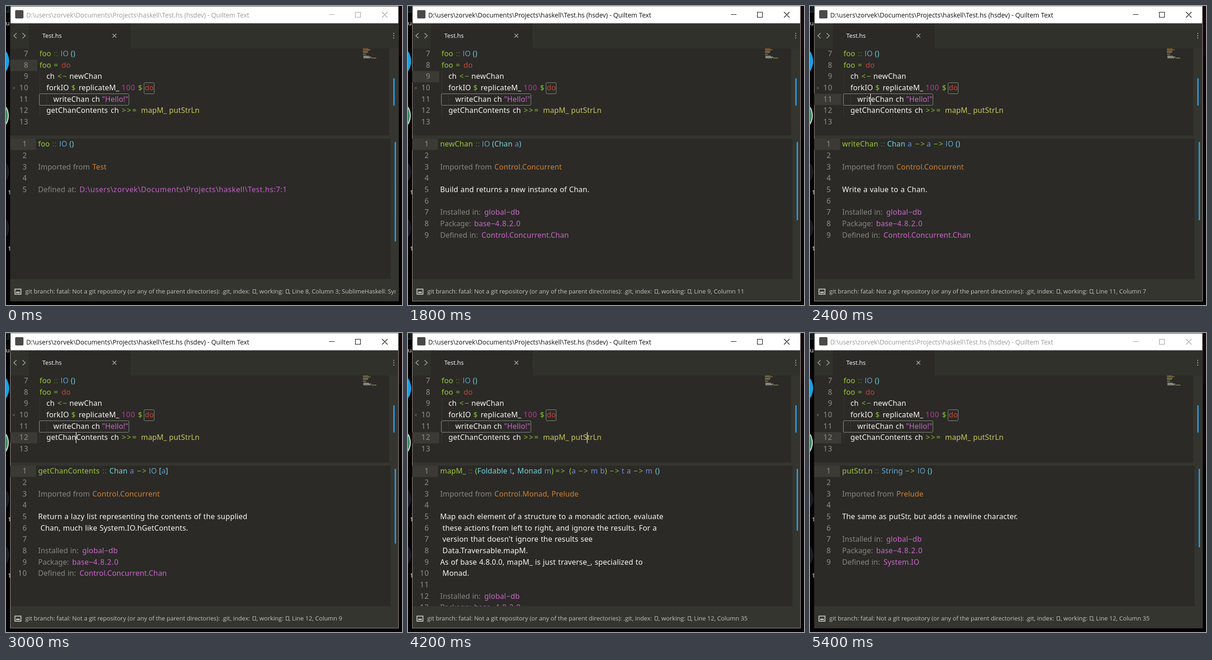
Write an HTML page that moves like this. It is 862x649 px and loops after 5.6 s.

```html
<!DOCTYPE html>
<html lang="en">
<head>
<meta charset="utf-8">
<title>Symbol info panel</title>
<style>
  html, body { margin: 0; width: 100%; height: 100%; overflow: hidden; background: #000; }
  svg { display: block; }
  text { white-space: pre; }
  .code { font: 16px "Noto Sans", sans-serif; letter-spacing: .17px; word-spacing: .7px; fill: #f8f8f2; }
  .ui { font: 13.1px "Open Sans", sans-serif; fill: #c4c4be; }
  .num { fill: #8f908a; letter-spacing: .9px; text-anchor: end; }
  .g { fill: #9aca32; }
  .d { fill: #56703f; letter-spacing: .7px; }
  .b { fill: #66a9d4; }
  .i { fill: #66a9d4; font-family: "Open Sans", sans-serif; }
  .c { fill: #73d3da; }
  .r { fill: #c0473a; }
  .o { fill: #86c332; letter-spacing: 2.2px; }
  .e { fill: #86c332; letter-spacing: .9px; }
  .n { fill: #bf379c; letter-spacing: .9px; }
  .s { fill: #c966c9; }
  .v { fill: #c966c9; letter-spacing: .9px; }
  .p { fill: #c55fc9; letter-spacing: .6px; }
  .y { fill: #c8c85c; }
  .t { fill: #d0812f; }
  .m { fill: #868680; letter-spacing: 0; }
  .a { fill: #6f8ed8; }
</style>
</head>
<body>
<svg id="stage" width="862" height="649" viewBox="0 0 862 649"></svg>
<script>
const LOOP = 5600, PITCH = 24.67, FOCUS = [1200, 5400];

const rect = (x, y, w, h, fill, more = '') =>
  `<rect x="${x}" y="${y}" width="${w}" height="${h}" fill="${fill}" ${more}/>`;
const path = (d, stroke, more = '') => `<path d="${d}" fill="none" stroke="${stroke}" ${more}/>`;
const circle = (x, y, r, fill, more = '') => `<circle cx="${x}" cy="${y}" r="${r}" fill="${fill}" ${more}/>`;
const escape = s => s.replace(/&/g, '&amp;').replace(/</g, '&lt;').replace(/>/g, '&gt;');
const label = (x, y, s, cls, more = '') => `<text x="${x}" y="${y}" class="${cls}" ${more}>${escape(s)}</text>`;

// Markup: "~" + style letter + optional "x|" column + text. Hyphens are drawn long.
function rich(x, y, source) {
  const spans = [...source.matchAll(/~(\w)(?:(\d+)\|)?([^~]*)/g)].map(([, style, col, s]) =>
    `<tspan class="${style}"${col ? ` x="${col}"` : ''}>${escape(s.replace(/-/g, '\u2212'))}</tspan>`);
  return `<text x="${x}" y="${y}" class="code">${spans.join('')}</text>`;
}

const codeLines = [
  [73, '~gfoo ~d104|:: ~i119|IO ~c141|()'],
  [73, '~gfoo ~o104|=~r121|do'],
  [88, '~wch ~o112|<-~w138|newChan'],
  [88, '~wforkIO ~e$ ~wreplicateM_ ~n100 ~e$ ~r302|do'],
  [103, '~wwriteChan ch ~s209|"Hello!"'],
  [88, '~wgetChanContents ~w228|ch ~o252|>>=~y294|mapM_ ~y355|putStrLn'],
  [73, '']
];

const imported = s => '~mImported from ~t188|' + s;
const footer = module => [
  '~mInstalled in: ~s166|global-db',
  '~mPackage: ~s144|base-~v4.8.2.0',
  '~mDefined in: ~s160|' + module
];

const steps = [
  { at: 0, line: 8, col: 3, x: 89, thumb: 216, note: '; SublimeHaskell: Syntax', doc: [
    '~gfoo ~d101|:: ~i116|IO ~c138|()', '', imported('Test'), '',
    '~mDefined at: ~p160|D:\\users\\zorvek\\Documents\\Projects\\haskell\\Test.hs:7:1'] },
  { at: 1200, line: 9, col: 11, x: 170, thumb: 170, doc: [
    '~gnewChan ~d147|:: ~i161|IO ~c183|(Chan ~aa~c)', '', imported('Control.Concurrent'), '',
    '~wBuild and returns a new instance of Chan.', '', ...footer('Control.Concurrent.Chan')] },
  { at: 2200, line: 11, col: 7, x: 131.5, thumb: 170, doc: [
    '~gwriteChan ~d154|:: ~c168|Chan ~aa ~o229|->~a254|a ~o269|->~i295|IO ~c317|()', '',
    imported('Control.Concurrent'), '',
    '~wWrite a value to a Chan.', '', ...footer('Control.Concurrent.Chan')] },
  { at: 2800, line: 12, col: 9, x: 152.5, thumb: 162, doc: [
    '~ggetChanContents ~d210|:: ~c225|Chan ~aa ~o285|->~i311|IO ~c333|[~aa~c]', '',
    imported('Control.Concurrent'), '',
    '~wReturn a lazy list representing the contents of the supplied',
    '~w Chan, much like System.IO.hGetContents.', '', ...footer('Control.Concurrent.Chan')] },
  { at: 3200, lag: 400, line: 12, col: 26, x: 309.5, thumb: 134, doc: [
    '~gmapM_ ~d131|:: ~g146|(~cFoldable ~at~w, ~c238|Monad ~am~g) ~o321|=>~g351|(~aa ~o371|->~a398|m b~g) ~o439|->~a465|t a ~o491|->~a517|m ~c538|()',
    '', imported('Control.Monad, Prelude'), '',
    '~wMap each element of a structure to a monadic action, evaluate',
    '~w these actions from left to right, and ignore the results. For a',
    "~w version that doesn't ignore the results see",
    '~w Data.Traversable.mapM.',
    '~wAs of base 4.8.0.0, mapM_ is just traverse_, specialized to',
    '~w Monad.', '', ...footer('Data.Foldable')] },
  { at: 4200, line: 12, col: 35, x: 390, thumb: 170, doc: [
    '~gputStrLn ~d141|:: ~b156|String ~o207|->~i234|IO ~c256|()', '', imported('Prelude'), '',
    '~wThe same as putStr, but adds a newline character.', '', ...footer('System.IO')] }
];

function desktop() {
  return rect(0, 0, 862, 649, '#050304') +
    rect(0, 0, 8, 14, '#1d3438') + rect(0, 2, 6, 10, '#0c1416') +
    circle(-31, 120, 38, '#1b9fe0') +
    circle(-30, 238, 35, '#3c8a5c', 'stroke="#dfe9e2" stroke-width="2"') +
    [360, 482].map(y => circle(-25, y, 31, '#17191c', 'stroke="#2b2e33"')).join('') +
    label(0, 42, 'u', 'ui', 'style="fill:#fff"') +
    [409, 531].map(y => label(4, y, '1', 'ui', 'style="fill:#fff"')).join('') +
    rect(855, 0, 7, 110, '#16060a') + rect(855, 110, 7, 180, '#0d0305');
}

function frameArt() {
  const bar = '#34352f', editor = '#2b2a27';
  const minimap = [[0, 12, '#a5672f'], [2, 17, '#8f8a3a'], [4, 13, '#a5672f'], [7, 11, '#d0cfc8'],
    [11, 8, '#7c8c3f'], [13, 6, '#6b7a50'], [16, 12, '#b9b8b0'], [18, 17, '#cfcec6'], [20, 15, '#a9a8a0']];
  return rect(9, 0, 846, 641, bar) + rect(9, 38, 845, 54, '#30312b') +
    rect(50, 38, 221, 54, editor) +
    rect(9, 92, 825, 189, editor) + rect(9, 288, 828, 305, editor) +
    rect(10, 1, 844, 36.5, '#fff') + rect(20, 9, 18, 18, '#4b4947', 'rx="2"') +
    path('M23 59l-6 5.5 6 5.5M36 59l6 5.5-6 5.5', '#b4b4ae', 'stroke-width="1.4"') +
    label(79, 69, 'Test.hs', 'ui', 'style="fill:#fff"') +
    path('M232 60.5l8 8m0-8l-8 8', '#b8b8b2', 'stroke-width="1.3"') +
    [58.5, 63.5, 68.5].map(y => rect(843, y, 2, 2, '#b4b4ae')).join('') +
    minimap.map(([y, w, fill]) => rect(777 + (y > 15 ? 1 : 0), 92 + y, w, 1.5, fill, 'opacity=".8"')).join('') +
    rect(795, 112, 11, 2, '#8f8a3a', 'opacity=".8"') +
    rect(843, 157, 3, 59, '#2d97dc') +
    path('M14.5 175.5l5 5m0-5l-5 5', '#74746e') +
    rect(19.5, 614.5, 13, 11, 'none', 'stroke="#c4c4be" stroke-width="2"') +
    rect(22, 620, 8, 3, '#c4c4be');
}

function code(step) {
  return rect(9, 116.5 + (step.line - 8) * PITCH, 59, 24.5, '#3b3a35') +
    path('M73.5 141V239M88.5 192V214', '#55554d', 'stroke-dasharray="1 2"') +
    rect(300.5, 166.5, 22, 24, 'none', 'rx="2" stroke="#8f8f88"') +
    rect(72.5, 190.5, 195, 25, 'none', 'rx="2" stroke="#8f8f88"') +
    codeLines.map(([x, s], i) => {
      const y = 109 + i * PITCH;
      return label(49, y, String(i + 7), 'code num') + rich(x, y, s);
    }).join('');
}

function info(step) {
  const rows = step.doc.map((s, i) => {
    const y = 305.3 + i * PITCH;
    const guide = s.startsWith('~w ') ? path(`M70.5 ${y - 17}v24`, '#41413b', 'stroke-dasharray="1 2"') : '';
    return guide + label(46, y, String(i + 1), 'code num') + rich(70, y, s);
  });
  return rect(9, 288, 56, 24.5, '#3b3a35') +
    `<g clip-path="url(#panel)">${rows.join('')}</g>` +
    rect(846, 295, 3, step.thumb, '#2d97dc');
}

function status(step) {
  const place = `, Line ${step.line}, Column ${step.col}${step.note || ''}`;
  const missing = x => rect(x, 615.5, 6, 8, 'none', 'stroke="#c4c4be"');
  const lead = 'git branch: fatal: Not a git repository (or any of the parent directories): .git, index:';
  return `<g clip-path="url(#status)">${label(42, 624, lead, 'ui')}${missing(537.5)}` +
    `${label(545, 624, ', working:', 'ui')}${missing(609.5)}${label(616, 624, place, 'ui')}</g>`;
}

function titleBar(active) {
  const ink = active ? '#000' : '#999';
  return label(44, 24.5, 'D:\\users\\zorvek\\Documents\\Projects\\haskell\\Test.hs (hsdev) - Quiltem Text',
      'ui', `style="font-size:14px;fill:${active ? '#111' : '#999'}"`) +
    path('M703 18.5h12M760.5 13.5h11v11h-11zM818.5 13l12 12m0-12l-12 12', ink, 'stroke-width="1.1"') +
    (active ? path('M9.5 38V640.5H854.5V38M9 .5H855', '#a39a94') : '');
}

const stage = document.getElementById('stage');
stage.innerHTML = `<defs>
  <clipPath id="panel"><rect x="9" y="288" width="828" height="305"/></clipPath>
  <clipPath id="status"><rect x="9" y="593" width="839" height="47"/></clipPath>
  </defs>${desktop()}${frameArt()}<g id="live"></g>`;
const live = document.getElementById('live');
let shown = '';

function render(t) {
  const active = t >= FOCUS[0] && t < FOCUS[1];
  const cursor = steps.findLast(s => t >= s.at);
  const topic = steps.findLast(s => t >= s.at + (s.at && (s.lag || 200)));
  const caret = active && (t - cursor.at) % 1000 < 600;
  const key = [active, cursor.at, topic.at, caret].join();
  if (key === shown) return;
  shown = key;
  live.innerHTML = titleBar(active) + code(cursor) + info(topic) + status(cursor) +
    (caret ? rect(cursor.x - .5, 116.5 + (cursor.line - 8) * PITCH, 1.2, 24, '#f8f8f0') : '');
}

const start = performance.now();
function tick() {
  render((performance.now() - start) % LOOP);
  requestAnimationFrame(tick);
}
tick();
</script>
</body>
</html>
```
